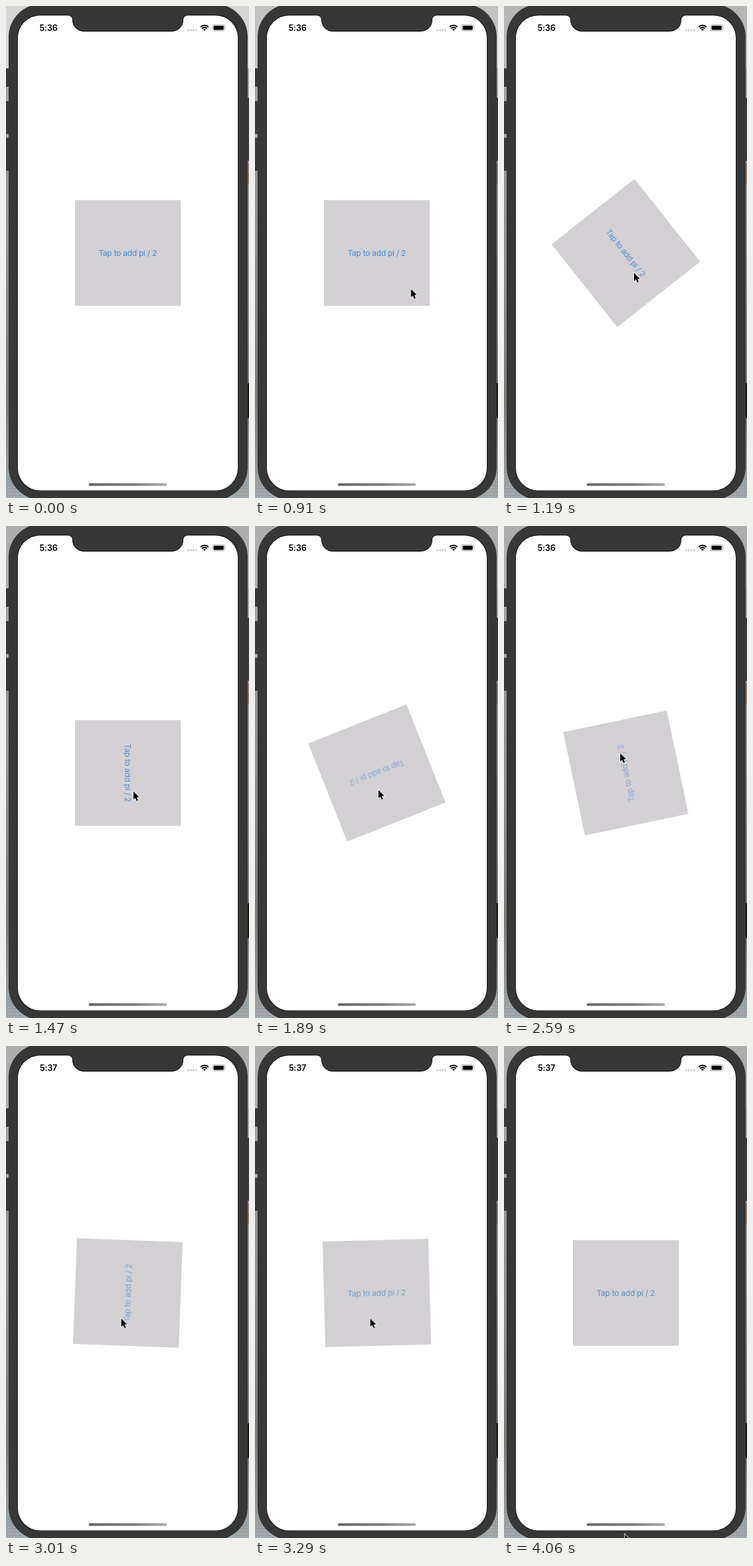
An HTML page for the animation above (4.13 s loop, 370 px wide and 750 px high).

```html
<!DOCTYPE html>
<html lang="en">
<head>
<meta charset="utf-8">
<title>Quarter turns</title>
<style>
  html, body { margin: 0; width: 100%; height: 100%; overflow: hidden; background: #8f8f8f; }
  svg { display: block; width: 370px; height: 750px; }
  text { font-family: Inter, Roboto, sans-serif; text-anchor: middle; }

  .anim { animation: 4130ms linear infinite paused; }
  .box { animation-name: turn; transform-origin: 185.5px 376.5px; }
  .label { animation-name: tint; font-size: 12px; letter-spacing: -.2px; }
  .clock { font-size: 12.6px; font-weight: 600; letter-spacing: -.1px; }
  .before { animation-name: before; }
  .after { animation-name: after; }
  .pointer { animation-name: point; }
  .sky { animation-name: dim; }

  /* four taps, each a 350 ms ease-in-out quarter turn */
  @keyframes turn {
    0% { transform: rotate(0deg); }
    24.21% { transform: rotate(0deg); animation-timing-function: ease-in-out; }
    32.69% { transform: rotate(90deg); }
    40.17% { transform: rotate(90deg); animation-timing-function: ease-in-out; }
    48.64% { transform: rotate(180deg); }
    56.38% { transform: rotate(180deg); animation-timing-function: ease-in-out; }
    64.85% { transform: rotate(270deg); }
    71.96% { transform: rotate(270deg); animation-timing-function: ease-in-out; }
    80.44%, 100% { transform: rotate(360deg); }
  }
  @keyframes tint {
    0%, 24.21% { fill: #3f8bea; }
    33%, 40% { fill: #5c91cc; }
    45.76% { fill: #86a8d8; }
    62.71% { fill: #7fa6dc; }
    79.66% { fill: #6b9fd4; }
    85%, 100% { fill: #5a8ecb; }
  }
  @keyframes point {
    0%, 10.17% { transform: translate(378px, 640px); animation-timing-function: ease-out; }
    22.03% { transform: translate(237.5px, 431.5px); }
    25.42% { transform: translate(200px, 408px); }
    35.59% { transform: translate(194px, 404.5px); }
    40.17%, 45.76% { transform: translate(188px, 402.5px); animation-timing-function: ease-in-out; }
    56.38%, 62.71% { transform: translate(177px, 346.5px); animation-timing-function: ease-in-out; }
    71.96%, 83.05% { transform: translate(175.5px, 415.5px); animation-timing-function: cubic-bezier(.4, 0, .75, .8); }
    94.92% { transform: translate(184px, 703.5px); animation-timing-function: ease-out; }
    98.31% { transform: translate(184px, 744.5px); }
    100% { transform: translate(184px, 760px); }
  }
  @keyframes before { 0%, 71.18% { opacity: 1; } 71.19%, 100% { opacity: 0; } }
  @keyframes after { 0%, 71.18% { opacity: 0; } 71.19%, 100% { opacity: 1; } }
  @keyframes dim { 0% { fill: #d6d6d6; } 22% { fill: #c2c2c2; } 34%, 100% { fill: #adadad; } }
</style>
</head>
<body>
<svg viewBox="0 0 370 750">
  <defs>
    <linearGradient id="water" x2="0" y2="1">
      <stop offset="0" stop-color="#a6a6a6"/>
      <stop offset=".5" stop-color="#9a9a9a"/>
      <stop offset=".8" stop-color="#808080"/>
      <stop offset="1" stop-color="#aab4b9"/>
    </linearGradient>
    <linearGradient id="bar">
      <stop offset="0" stop-color="#646464"/>
      <stop offset=".6" stop-color="#7c7c7c"/>
      <stop offset="1" stop-color="#aaa"/>
    </linearGradient>
    <pattern id="ripple" width="4" height="5" patternUnits="userSpaceOnUse">
      <path d="M0 1H4M1 3.5H3" stroke="#444" stroke-opacity=".35"/>
    </pattern>
  </defs>

  <!-- backdrop slivers -->
  <rect width="370" height="750" fill="url(#water)"/>
  <rect y="250" width="370" height="500" fill="url(#ripple)"/>
  <rect class="anim sky" width="370" height="95"/>
  <path d="M0 95H5V123H0ZM0 145H5V195H0ZM0 201H5V251H0Z" fill="#383838"/>
  <path d="M366 140H370V236H366Z" fill="#3a3a3a"/>
  <path d="M366 240H370V272H366Z" fill="#8f7860"/>
  <path d="M366 575H370V628H366Z" fill="#15130f"/>

  <!-- phone -->
  <rect x="4" y="-3" width="364" height="756" rx="50" fill="#373737"/>
  <path fill="#fff" stroke="#111" stroke-width="2" paint-order="stroke"
    d="M52 14.5H94Q101 14.5 101 22A18 17 0 0 0 119 39H252A18 17 0 0 0 270 22Q270 14.5 277 14.5H319A34 34 0 0 1 353 48.5V704.5A34 34 0 0 1 319 738.5H52A34 34 0 0 1 18 704.5V48.5A34 34 0 0 1 52 14.5Z"/>

  <!-- status bar -->
  <g class="clock">
    <text class="anim before" x="64.7" y="38">5:36</text>
    <text class="anim after" x="64.7" y="38">5:37</text>
  </g>
  <path d="M277.5 37H291" stroke="#c6c6c6" stroke-width="2.8" stroke-linecap="round" stroke-dasharray="0 4"/>
  <g fill="none" stroke="#000" stroke-width="2">
    <path d="M296.4 32A8.4 8.4 0 0 1 308.2 32M298.6 34.3A5.2 5.2 0 0 1 306 34.3"/>
    <path d="M302.3 38L300.2 35.9A3 3 0 0 1 304.4 35.9Z" fill="#000" stroke="none"/>
  </g>
  <rect x="314.5" y="28.5" width="18.5" height="9.4" rx="2.6" fill="none" stroke="#aaa"/>
  <rect x="316" y="30" width="15.5" height="6.4" rx="1.3"/>
  <path d="M334 31.5Q335.4 33.2 334 35Z" fill="#999"/>

  <rect x="126" y="727.5" width="119" height="4" rx="2" fill="url(#bar)"/>

  <g class="anim box">
    <rect x="105" y="296" width="161" height="161" fill="#d2d0d3"/>
    <text class="anim label" x="185.3" y="381">Tap to add pi / 2</text>
  </g>

  <path class="anim pointer" d="M0 0V12.6L2.9 9.9L5 14.7L7.1 13.8L5.1 9.1H9Z"
    stroke="#fff" stroke-width="1.6" paint-order="stroke"/>
</svg>
<script>
  const LOOP = 4130, STEP = 70;
  const anims = document.getAnimations();
  const start = performance.now();

  function draw() {
    const t = (performance.now() - start) % LOOP;
    const held = Math.floor(t / STEP) * STEP;
    for (const a of anims) a.currentTime = held;
    requestAnimationFrame(draw);
  }
  draw();
</script>
</body>
</html>
```
